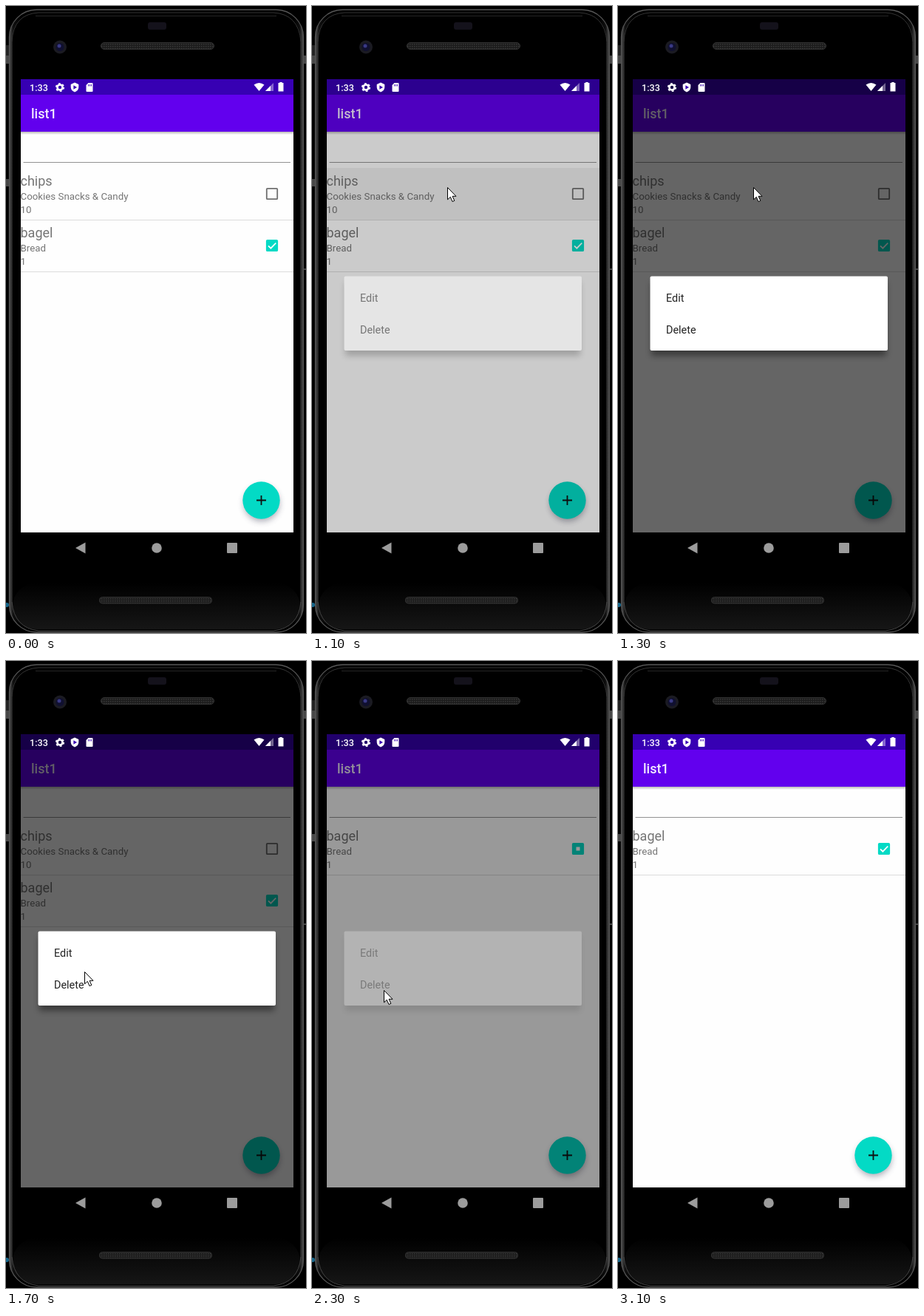
Write an HTML page that moves like this. It is 406 px wide and 848 px high and loops after 3600 ms.

```html
<!DOCTYPE html>
<html lang="en">
<head>
<meta charset="utf-8">
<title>Shopping list</title>
<style>
  html, body { margin: 0; width: 100%; height: 100%; overflow: hidden; background: #000; }
  svg { display: block; width: 100vw; height: 100vh; }
  text { font-family: Roboto, "Noto Sans", sans-serif; white-space: pre; }
  .name { font-size: 18px; fill: #757575; }
  .detail { font-size: 13.3px; fill: #757575; }
  .option { font-size: 14.4px; fill: #222; }
</style>
</head>
<body>
<svg viewBox="0 0 406 848" xmlns="http://www.w3.org/2000/svg">
  <defs>
    <linearGradient id="edge" gradientUnits="userSpaceOnUse" x1="4" x2="403" y1="0" y2="0">
      <stop offset="0" stop-color="#505050"/>
      <stop offset=".008" stop-color="#333"/>
      <stop offset=".014" stop-color="#101010"/>
      <stop offset=".035" stop-color="#050505"/>
      <stop offset=".04" stop-color="#000"/>
      <stop offset=".965" stop-color="#000"/>
      <stop offset=".986" stop-color="#101010"/>
      <stop offset=".992" stop-color="#333"/>
      <stop offset="1" stop-color="#505050"/>
    </linearGradient>
    <linearGradient id="foot" x1="0" x2="0" y1="0" y2="1">
      <stop offset="0" stop-color="#000"/>
      <stop offset="1" stop-color="#161616"/>
    </linearGradient>
    <linearGradient id="drop" x1="0" x2="0" y1="0" y2="1">
      <stop offset="0" stop-opacity=".28"/>
      <stop offset="1" stop-opacity="0"/>
    </linearGradient>
    <pattern id="mesh" width="3" height="3" patternUnits="userSpaceOnUse">
      <rect width="3" height="3" fill="#1c1c1c"/>
      <rect width="1.5" height="1.5" fill="#383838"/>
    </pattern>
    <filter id="soft" x="-30%" y="-50%" width="160%" height="200%">
      <feGaussianBlur stdDeviation="4"/>
    </filter>
    <clipPath id="screen"><rect x="20" y="99" width="369" height="613"/></clipPath>
    <clipPath id="row"><rect x="20" y="219" width="369" height="70"/></clipPath>
  </defs>

  <!-- Phone body -->
  <rect width="406" height="848"/>
  <g fill="#474747">
    <rect y="53" width="4" height="14" fill="#222"/>
    <rect y="67" width="7" height="11"/>
    <rect y="234" width="7" height="10"/>
    <rect x="400" y="67" width="6" height="11"/>
    <rect x="403" y="355" width="3" height="2"/>
  </g>
  <rect x="4.5" y="5" width="398" height="842" rx="37" fill="url(#edge)" stroke="#555" stroke-width="1.3"/>
  <rect x="9" y="9" width="389" height="834" rx="33" fill="#000"/>
  <rect x="9" y="780" width="389" height="63" rx="33" fill="url(#foot)"/>
  <path d="M8 48Q10 11 44 9H362Q396 11 399 48" fill="none" stroke="#333"/>
  <path d="M40 13.5H366" stroke="#262626"/>
  <path d="M8 806Q11 841 44 845H362Q396 841 399 806" fill="none" stroke="#444"/>
  <circle cx="1" cy="810" r="3" fill="#16678c"/>
  <rect x="192" y="22" width="25" height="10" rx="3" fill="#14121b"/>
  <circle cx="73" cy="55.500" r="9" fill="#1b1b22"/>
  <circle cx="73" cy="55.500" r="5.500" fill="#10102f"/>
  <circle cx="72" cy="54" r="2.500" fill="#393984"/>
  <g fill="url(#mesh)" stroke="#333">
    <rect x="128.500" y="49.500" width="153" height="9" rx="4.500"/>
    <rect x="126.500" y="799.500" width="152" height="8.500" rx="4"/>
  </g>
  <g fill="#9c9c9c">
    <path d="M94 733L107.500 725.500V740.500Z"/>
    <circle cx="204" cy="733" r="6.800"/>
    <rect x="299" y="726" width="14" height="14" rx="1"/>
  </g>

  <g clip-path="url(#screen)">
    <rect x="20" y="99" width="369" height="613" fill="#fefefe"/>
    <circle id="ripple" cx="204" cy="254" fill="#e4e4e4" clip-path="url(#row)"/>
    <rect x="20" y="99" width="369" height="21.500" fill="#3700b3"/>
    <rect x="20" y="120" width="369" height="50" fill="#6200ee"/>
    <rect x="20" y="170" width="369" height="4" fill="url(#drop)"/>
    <text x="34" y="152" font-size="18" font-weight="500" fill="#f4edff">list1</text>
    <path d="M23.500 211.500H385" stroke="#929292" stroke-width="1.200"/>
    <g id="list"></g>
    <circle cx="346" cy="673" r="24" fill="#33334d" opacity=".4" filter="url(#soft)"/>
    <circle cx="345.500" cy="668.500" r="25.200" fill="#03dac5"/>
    <path d="M339 668.500H352M345.500 662V675" stroke="#111" stroke-width="1.800"/>
    <rect id="dim" x="20" y="99" width="369" height="613"/>

    <!-- Status icons stay bright above the dimming -->
    <g fill="#fff">
      <text x="32" y="114.500" font-size="12.600" font-weight="500">1:33</text>
      <circle cx="73" cy="110" r="3.500" fill="none" stroke="#fff" stroke-width="2.600"/>
      <circle cx="73" cy="110" r="5.200" fill="none" stroke="#fff" stroke-width="1.800" stroke-dasharray="2.700 2.745"/>
      <path d="M93 103.500L98.300 106V110Q98 114.500 93 116.500Q88 114.500 87.700 110V106Z"/>
      <path d="M91.400 107.300L96 110L91.400 112.700Z" fill="#3700b3"/>
      <path d="M111.500 104H116.500Q117.500 104 117.500 105V115Q117.500 116 116.500 116H109.500Q108.500 116 108.500 115V107Z"/>
      <path d="M111.500 106V108.500M113.500 106V108.500M115.500 106V108.500" stroke="#3700b3" stroke-width=".9"/>
      <path d="M335.500 106.500Q342.500 101.500 349.500 106.500L342.500 115Z"/>
      <path d="M351 115L362 104V115Z" opacity=".4"/>
      <path d="M351 115L358 108V115Z"/>
      <path d="M370.300 104V103H373.700V104H375.500V115.500H368.500V104Z"/>
    </g>

    <g id="dialog">
      <rect x="45" y="374" width="318" height="99" opacity=".42" filter="url(#soft)"/>
      <rect x="43.500" y="365.500" width="321.500" height="100.500" rx="2" fill="#fff"/>
      <text class="option" x="65" y="400">Edit</text>
      <text class="option" x="65" y="443">Delete</text>
    </g>
  </g>
  <path id="cursor" d="M.5 .5V16.800L4.300 13.300L7 19.500L9.800 18.300L7.100 12.300H12Z" fill="#fff" stroke="#000" stroke-linejoin="round"/>
</svg>
<script>
const LOOP = 3600, STEP = 100, ROW_HEIGHT = 70, DELETED_AT = 2300;
const items = [
  { name: 'chips', category: 'Cookies Snacks & Candy', count: 10, checked: false },
  { name: 'bagel', category: 'Bread', count: 1, checked: true }
];
const $ = id => document.getElementById(id);

function add(parent, tag, attrs, text = '') {
  const node = document.createElementNS('http://www.w3.org/2000/svg', tag);
  for (const key in attrs) node.setAttribute(key, attrs[key]);
  node.textContent = text;
  return parent.appendChild(node);
}

function makeRow(item) {
  const row = add($('list'), 'g', {});
  add(row, 'text', { class: 'name', x: 19.500, y: 243 }, item.name);
  add(row, 'text', { class: 'detail', x: 19.500, y: 262 }, item.category);
  add(row, 'text', { class: 'detail', x: 19.500, y: 280 }, item.count);
  add(row, 'path', { d: 'M20 289.500H389', stroke: '#dcdcdc' });
  const tint = item.checked ? '#03dac5' : '#707070';
  add(row, 'rect', {
    x: 352.800, y: 246.800, width: 14.400, height: 14.400, rx: 1,
    fill: item.checked ? tint : 'none', stroke: tint, 'stroke-width': 1.800
  });
  if (item.checked) {
    item.tick = add(row, 'path', {
      d: 'M355 254.300L358.400 257.700L365.300 250.500', fill: 'none', stroke: '#fff', 'stroke-width': 1.800
    });
    item.dot = add(row, 'rect', { x: 357.500, y: 251.500, width: 5, height: 5, fill: '#fff' });
  }
  return row;
}

// Linear interpolation between [time, value] keys.
function track(keys, t) {
  const next = keys.findIndex(key => key[0] > t);
  if (next === 0) return keys[0][1];
  if (next < 0) return keys[keys.length - 1][1];
  const [t0, a] = keys[next - 1], [t1, b] = keys[next];
  return a + (b - a) * (t - t0) / (t1 - t0);
}

const dimming = [[1000, 0], [1100, .2], [1200, .48], [1300, .6], [2200, .6], [2300, .4], [2400, .13], [2500, 0]];
const dialogFade = [[1000, 0], [1100, .5], [1200, 1], [2200, 1], [2300, .26], [2400, 0]];
const rippleRadius = [[600, 0], [700, 129], [800, 192]];
const rippleFade = [[1000, 1], [1100, .5], [1200, 0]];
const cursorX = [[100, 300], [200, 207], [300, 187], [400, 183], [1300, 183], [1500, 152], [1700, 106], [1900, 97], [2500, 97], [2800, 186]];
const cursorY = [[100, 560], [200, 325], [300, 255], [400, 245], [1300, 245], [1500, 310], [1700, 420], [1900, 445], [2500, 445], [2800, 458]];

const rows = items.map(makeRow);
const show = (node, visible) => node.setAttribute('display', visible ? 'inline' : 'none');

function render(ms) {
  const t = Math.floor(ms % LOOP / STEP) * STEP;
  const deleted = t >= DELETED_AT, rechecking = t === DELETED_AT;
  show(rows[0], !deleted);
  rows[1].setAttribute('transform', `translate(0 ${deleted ? 0 : ROW_HEIGHT})`);
  show(items[1].tick, !rechecking);
  show(items[1].dot, rechecking);
  $('ripple').setAttribute('r', track(rippleRadius, t));
  $('ripple').setAttribute('opacity', track(rippleFade, t));
  $('dim').setAttribute('opacity', track(dimming, t));
  $('dialog').setAttribute('opacity', track(dialogFade, t));
  show($('cursor'), t >= 100 && t < 2900);
  $('cursor').setAttribute('transform', `translate(${track(cursorX, t)} ${track(cursorY, t)})`);
}

const start = performance.now();
function frame() {
  render(performance.now() - start);
  requestAnimationFrame(frame);
}
frame();
</script>
</body>
</html>
```
